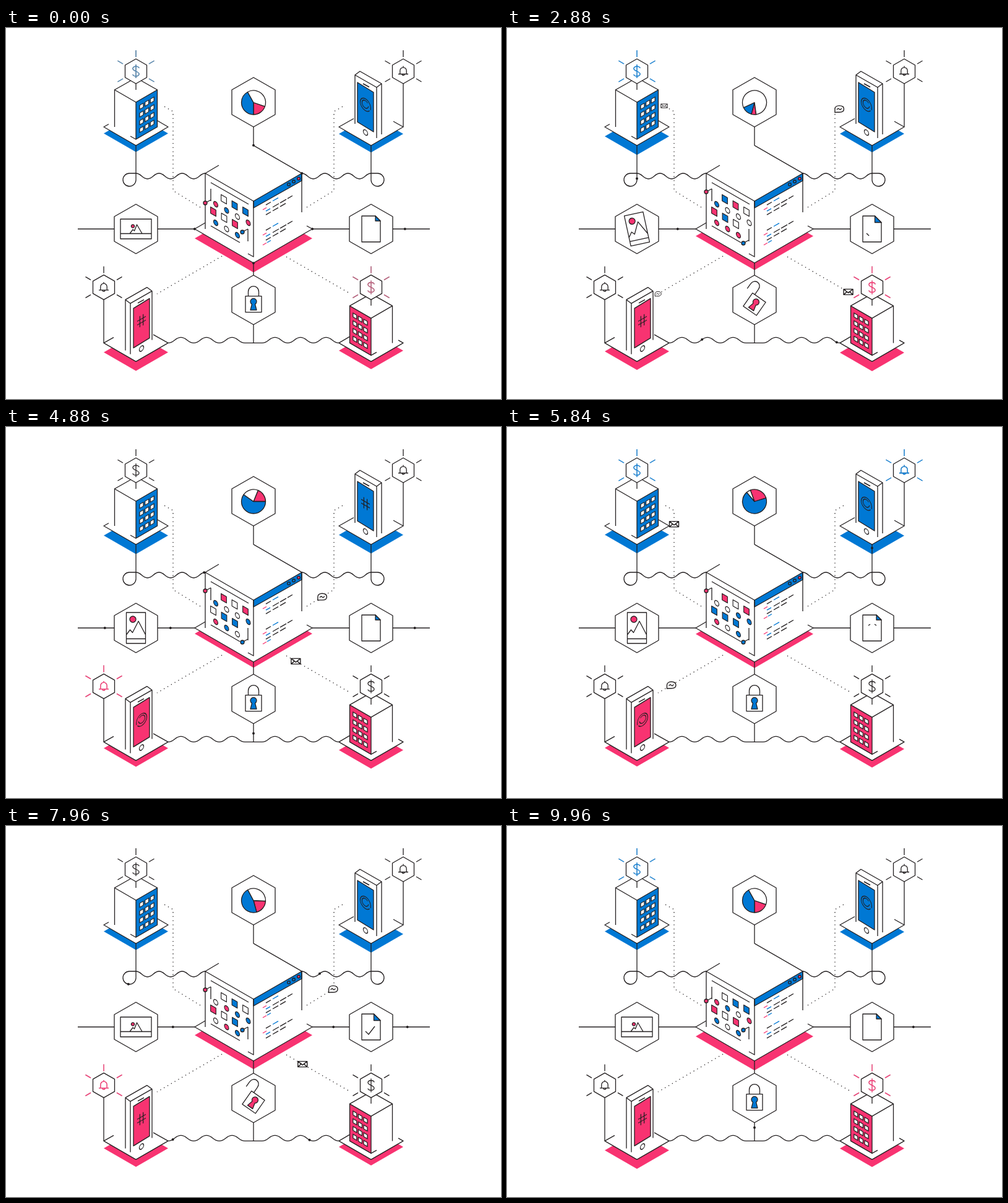
An HTML page with a canvas that plays this animation: 800 by 600 pixels, repeating every 10 s.

```html
<!DOCTYPE html>
<html lang="en">
<head>
<meta charset="utf-8">
<title>Connected services</title>
<style>
html, body { margin: 0; width: 100%; height: 100%; overflow: hidden; background: #fff; }
canvas { display: block; }
</style>
</head>
<body>
<canvas id="stage" width="800" height="600"></canvas>
<script>
const ctx = document.getElementById('stage').getContext('2d');
const LOOP = 10000, TAU = Math.PI * 2, LOW = 509.4;
const INK = '#231f20', BLUE = '#0078d4', PINK = '#f83371', WHITE = '#fff';
const FILLS = { W: WHITE, B: BLUE, P: PINK };

const clamp = v => Math.max(0, Math.min(1, v));
const smooth = v => v * v * (3 - 2 * v);
const mix = (a, b, p) => a + (b - a) * p;
const pulse = (t, from, to, ramp) => smooth(clamp(Math.min(t - from, to - t) / ramp));
const since = (t, start) => (t - start + 2 * LOOP) % LOOP;

function draw(d, fill, stroke = INK, width = 1.3) {
  const path = new Path2D(d);
  if (fill) { ctx.fillStyle = fill; ctx.fill(path); }
  if (stroke) { ctx.strokeStyle = stroke; ctx.lineWidth = width; ctx.stroke(path); }
}
function disc(x, y, r, fill, stroke = INK) {
  draw(`M${x - r} ${y}a${r} ${r} 0 1 1 ${2 * r} 0a${r} ${r} 0 1 1 ${-2 * r} 0`, fill, stroke);
}
function at(x, y, paint, { wide = 1, turn = 0, scale = 1, skew = 0 } = {}) {
  ctx.save();
  ctx.translate(x, y);
  ctx.rotate(turn);
  ctx.transform(wide * scale, skew * scale, 0, scale, 0, 0);
  paint();
  ctx.restore();
}
const ISO = { wide: .87, skew: .5 };
const hexagon = r => {
  const w = r * .875, h = r / 2;
  return `M0 ${-r}L${w} ${-h}V${h}L0 ${r}L${-w} ${h}V${-h}Z`;
};
const diamond = (x, y, w, h) => `M${x - w} ${y}l${w} ${-h}l${w} ${h}l${-w} ${h}Z`;

// Connectors
function wave(count, step, height) {
  let d = '';
  for (let i = 0; i < count; i++) {
    const dy = i % 2 ? -height : height;
    d += `c${step * .45} 0 ${step * .55} ${dy} ${step} ${dy}`;
  }
  return d;
}
const loopWave = s => `M${400 - 190 * s} 190v56a10.5 10.5 0 1 ${s > 0 ? 1 : 0} ${-10.5 * s} -11h${10.5 * s}` + wave(6, 18.67 * s, 9);
const lowWave = s => `M${400 - 138 * s} ${LOW}` + wave(6, 20.67 * s, -9) + `h${14 * s}`;

function route(d) {
  const path = document.createElementNS('http://www.w3.org/2000/svg', 'path');
  path.setAttribute('d', d);
  const length = path.getTotalLength();
  return { d, point: p => path.getPointAtLength(p * length) };
}
// Each line carries dots: start times, travel time, direction
const lines = [
  ['M400 190V160', [0], 150],
  ['M478 235L400 190'],
  ['M305 325H245', [0, 1050, 2735, 4685, 7785], 300],
  ['M176 325H116', [4800, 7660], 300],
  ['M495 325H555', [0, 1025, 7790], 300],
  ['M685 325H625', [4800, 7840, 9867], 200],
  ['M400 380V400', [0, 1065], 100],
  [`M400 ${LOW}V480`, [4810, 9850], 150],
  [loopWave(1), [2670, 3928, 7670], 960],
  [loopWave(-1), [0, 810, 4904, 7830], 960, -1],
  [lowWave(1), [2646, 7929], 600],
  [lowWave(-1), [2860, 7754], 600]
].map(([d, starts = [], time = 1, way = 1]) => ({ ...route(d), starts, time, way }));

// Messages go out from the cube or come back in
const TRIP = 2500;
const mails = [
  ['M314 290L270 263V135L254 126', envelope, 330, 5330],
  ['M486 290L530 263V135L546 126', bubble, 7330, 2750],
  ['M349 369L244 430', bubble, 330, 5330],
  ['M453 370L557 430', envelope, 7330, 2750]
].map(([d, icon, out, back]) => ({ ...route(d), icon, out, back }));

function envelope() {
  draw('M-7.5 -4.5H7.5V4.5H-7.5ZM-7.5 -4.5L0 1.5L7.5 -4.5M-7.5 4.5L-2.5 0M7.5 4.5L2.5 0', WHITE, INK, 1.4);
}
function bubble() {
  draw('M-7 5.5V0C-7 -3.5 -4 -5.5 0 -5.5C4.5 -5.5 7.5 -3.5 7.5 0C7.5 3.5 4.5 5.2 0 5.2H-3.5Z', WHITE, INK, 1.4);
  draw('M-4 1L-1.5 -1L1.5 1.2L4 -1', null);
}
function paintMails(t) {
  for (const { point, icon, out, back } of mails) for (const start of [out, back]) {
    const age = t - start;
    const scale = clamp(Math.min(age / 100, (TRIP + 120 - age) / 100));
    if (!scale) continue;
    const p = clamp(age / TRIP);
    const { x, y } = point(start === out ? p : 1 - p);
    at(x, y, icon, { scale });
  }
}
function paintDots(t) {
  for (const { point, starts, time, way } of lines) for (const start of starts) {
    const p = since(t, start) / time;
    if (p > 1) continue;
    const { x, y } = point(way > 0 ? p : 1 - p);
    disc(x, y, 2, INK, null);
  }
}

// Badges
const DOLLAR = 'M5 -5C5 -9 -5 -9 -5 -4.3C-5 0 5 0 5 4.3C5 9 -5 9 -5 5M0 -11V11';
const BELL = 'M-8 4.5H8M-5.2 4.5V-1A5.2 5.2 0 0 1 5.2 -1V4.5M0 -6.2V-8.5M-2 4.5A2 2 0 0 0 2 4.5';
function badge(t, x, y, sign, color, flashes) {
  let glow = 0;
  for (const [from, to] of flashes)
    for (const time of [t, t + LOOP]) glow = Math.max(glow, clamp(Math.min(time - from, to - time) / 80));
  at(x, y, () => {
    draw(hexagon(20), WHITE);
    const rays = 'M0 -34V-23' + [[1, 1], [1, -1], [-1, 1], [-1, -1]]
      .map(([a, b]) => `M${a * 21} ${b * 12}L${a * 29.5} ${b * 17}`).join('');
    draw(sign + rays, null, INK);
    ctx.globalAlpha = glow;
    draw(sign + rays, null, WHITE, 1.5);
    draw(sign + rays, null, color);
  });
}

// Stands with a building or a phone, built around the platform centre
function shadow(t, x, y, w, h, color, mean, peak) {
  const drop = mean + 3 * Math.cos((t - peak) / LOOP * TAU);
  draw(diamond(x, y + drop, w, h), color, null);
}
function building(color) {
  draw(diamond(0, 0, 52, 30), WHITE, null);
  draw('M-44 -4.5L-52 0L0 30L52 0L35 -10', null);
  draw('M-34.5 0V-60L0 -80L34.5 -60V0L0 20Z', WHITE, null);
  draw('M0 -40L34.5 -60V0L0 20Z', color);
  draw('M-34.5 0V-60L0 -40M-34.5 -60L-8 -75M34.5 -60L8 -75M-9 15L0 20', null);
  for (let col = 0; col < 3; col++) for (let row = 0; row < 4; row++)
    at(9 + 8.6 * col, -33.5 - 5 * col + 12.5 * row, () => draw('M-3 -3.2H3V3.2H-3Z', WHITE), { skew: -.577 });
}
function phone(color, hash) {
  draw(diamond(0, 0, 52, 30), WHITE, null);
  draw('M-28 -13.5L-52 0L0 30L52 0L36 -9', null);
  draw('M-26 0V-84L-18 -90L17 -70V10L9 18Z', WHITE, null);
  draw('M-26 -5V-84L9 -64V18M-26 -84L-18 -90L17 -70V12M9 -64L17 -70', null);
  draw('M-22 -72L4 -56V8L-22 -8Z', color);
  draw('M-13 -70L-3 -64.5', null, INK, 1.6);
  at(-9, 9, () => disc(0, 0, 4.1, WHITE), ISO);
  at(-9, -36, () => {
    if (hash) draw('M-3 -9V9M3 -9V9M-8 -3H8M-8 3H8', null, INK, 1.4);
    else draw('M7.5 6A9.6 9.6 0 1 1 9.5 0V4M5.5 0A6 6 0 1 1 4 -4.5', null, INK, 1.2);
  }, ISO);
}

// Hexagon icons
const pieKeys = [[19, 90, 241], [19, 90, 241], [82, 105, 155], [-68, 0, 215], [-110, -17, 230], [3, 75, 242], [19, 90, 241]];
const times = [0, 1120, 2880, 4880, 5840, 7960, 9960];
const keyAt = t => Math.max(0, times.findLastIndex(time => time <= t));

function pie(t) {
  const k = Math.min(keyAt(t), 5);
  const p = smooth(clamp((t - times[k]) / (times[k + 1] - times[k])));
  const [a, b, c] = pieKeys[k].map((v, i) => mix(v, pieKeys[k + 1][i], p) * Math.PI / 180);
  for (const [from, to, color] of [[a, b, PINK], [b, c, BLUE], [c, a + TAU, WHITE]]) {
    ctx.beginPath();
    ctx.moveTo(0, .5);
    ctx.arc(0, .5, 19.5, from, to);
    ctx.closePath();
    ctx.fillStyle = color; ctx.fill();
    ctx.strokeStyle = INK; ctx.lineWidth = 1.3; ctx.stroke();
  }
}
function picture(t) {
  const p = pulse(t, 2420, 7400, 600), quarter = Math.PI / 2;
  at(0, 0, () => {
    if (p < .5) {
      draw('M-25 -16H25V16H-25ZM-25 7.5H25M-10 7.5L-5 1L-2.5 3L1.5 -7L10 7.5', WHITE);
      disc(-5, -4.5, 2.6, PINK);
    } else {
      draw('M-15.5 -25H15.5V25H-15.5ZM-15.5 17.5H15.5M-15.5 11L-9.5 3L-5.5 7.5L4 -11L15.5 11', WHITE);
      disc(-5, -14, 5, PINK);
    }
  }, { turn: (p < .5 ? p : p - 1) * quarter });
}
function page(t) {
  const checks = [[2780, 3800], [7300, 8400]];
  const fold = 8 + 2.5 * Math.max(...checks.map(([a, b]) => pulse(t, a - 300, b, 200)));
  draw(`M-15 -21H${15 - fold}L15 ${fold - 21}V21H-15Z`, WHITE);
  draw(`M${15 - fold} -21V${fold - 21}H15Z`, BLUE);
  for (const [from, to] of checks) if (t > from && t < to) {
    ctx.setLineDash([clamp((t - from) / 420) * 24, 99]);
    draw('M-9 7L-4 12L6 -1', null);
    ctx.setLineDash([]);
  }
  if (t > 5750 && t < 6250) draw('M-6 -4L-3 -6M4 -6L7 -4', null);
}
function lock(t) {
  const p = pulse(t, 500, 4000, 300) + pulse(t, 6800, 9400, 300);
  at(0, 7, () => {
    const end = -8.5 + 17 * mix(1, -.92, p), top = mix(-20, -23, p);
    draw(`M-8.5 -13V${top}C-8.5 ${top - 12} ${end} ${top - 12} ${end} ${top}V${mix(-13, -14, p)}`, null);
    draw('M-13 -13H13V13H-13Z', WHITE);
    draw('M-2.6 0A5 5 0 1 1 2.6 0L5 9.5H-5Z', p > .5 ? PINK : BLUE);
  }, { turn: .61 * p });
}

// Central cube
const cellKeys = ['WBBPBWPPWPBWB', 'WBBPBWBPPPBWP', 'BPWBWWWPBWPPP', 'PWPBWWBWBBPBW', 'PWPWWBBBBBPWB', 'WBWWPBBPWBWPB', 'WBBPBWPPWPBWB'];
const cellRows = [[352, 277, 3, true], [339, 285, 4], [335, 297, 3, true], [339, 315, 3]];
const codeRows = [
  [0, [420, 428], [431, 440, BLUE]],
  [5, [415, 421, PINK]],
  [10, [420, 427, BLUE], [431, 441], [443, 453], [455, 463]],
  [16, [420, 428], [431, 440], [443, 452]],
  [21, [415, 421, PINK], [422, 428, BLUE]]
];
function cells(t) {
  const k = keyAt(t);
  let i = 0;
  for (const [x, y, count, square] of cellRows) for (let n = 0; n < count; n++, i++) {
    const span = (times[k + 1] || LOOP) - times[k];
    const swapped = t - times[k] > span * (i * 5 % 13 + 1) / 14;
    const color = FILLS[(swapped && cellKeys[k + 1] || cellKeys[k])[i]];
    at(x + 17.5 * n, y + 10 * n, () => {
      if (square) draw('M-5 -5H5V5H-5Z', color);
      else disc(0, 0, 4, color);
    }, ISO);
  }
}
function cube(t) {
  draw(diamond(400, 325, 95, 55), WHITE, null);
  draw('M322 315L305 325L400 380L495 325L486 320', null);
  draw('M322 235L400 190L478 235V325L400 370L322 325Z', WHITE, null);
  draw('M400 280L478 235V247L400 291Z', BLUE);
  draw('M344 222L322 235L400 280V370L391 365M322 235V325M400 190L478 235V298', null);
  [BLUE, BLUE, PINK].forEach((color, i) => disc(457 + 8 * i, 253 - 4.7 * i, 2.3, color));

  for (let group = 0; group < 2; group++) {
    const shown = 4 + (Math.floor(t / 1000) + group) % 2;
    for (const [drop, ...parts] of codeRows.slice(0, shown)) for (const [from, to, color = INK] of parts) {
      const y = x => 289 + 41 * group + drop - (x - 415) * .577;
      draw(`M${from} ${y(from)}L${to} ${y(to)}`, null, color);
    }
  }

  draw('M331 250L392 285M331 320L378 347M331 260V280M391 325V345', null);
  cells(t);
  const left = mix(283, 265, pulse(t, 600, 9300, 300));
  const right = mix(330, 348, pulse(t, 1800, 7000, 300));
  draw(`M322 ${left}L331 ${left - 5}M382 ${right}L391 ${right - 5}`, null);
  disc(322, left, 3, PINK);
  disc(382, right, 3, BLUE);
}

function paint(t) {
  ctx.fillStyle = WHITE;
  ctx.fillRect(0, 0, 800, 600);
  ctx.lineJoin = 'round';

  shadow(t, 210, 160, 52, 30, BLUE, 13, 4000);
  shadow(t, 590, 160, 52, 30, BLUE, 13, 6500);
  shadow(t, 210, 510, 52, 30, PINK, 12, 900);
  shadow(t, 590, 510, 52, 30, PINK, 12, 2700);
  shadow(t, 400, 325, 95, 55, PINK, 12.3, 9900);

  ctx.setLineDash([1.3, 5.4]);
  for (const { d } of mails) draw(d, null);
  ctx.setLineDash([]);
  for (const { d } of lines) draw(d, null);

  cube(t);
  at(210, 160, () => building(BLUE));
  at(590, LOW, () => building(PINK), { wide: -1 });
  at(590, 160, () => phone(BLUE, t > 3800 && t < 5400));
  at(210, LOW, () => phone(PINK, t < 3800 || t > 7000), { wide: -1 });

  draw(`M210 90V100M642 90V160M158 439V${LOW}M590 439V449`, null);
  badge(t, 210, 70, DOLLAR, BLUE, [[2700, 3300], [5700, 6300], [9700, 10040]]);
  badge(t, 590, 419.4, DOLLAR, PINK, [[2700, 3300], [9700, 10040]]);
  badge(t, 642, 70, BELL, BLUE, [[5500, 6100]]);
  badge(t, 158, 419.4, BELL, PINK, [[4600, 5200], [7700, 8300]]);

  for (const [x, y, icon] of [[400, 120, pie], [210, 325, picture], [590, 325, page], [400, 439.7, lock]])
    at(x, y, () => { draw(hexagon(40), WHITE); icon(t); });

  paintDots(t);
  paintMails(t);
}

function tick() {
  paint(performance.now() % LOOP);
  requestAnimationFrame(tick);
}
tick();
</script>
</body>
</html>
```
